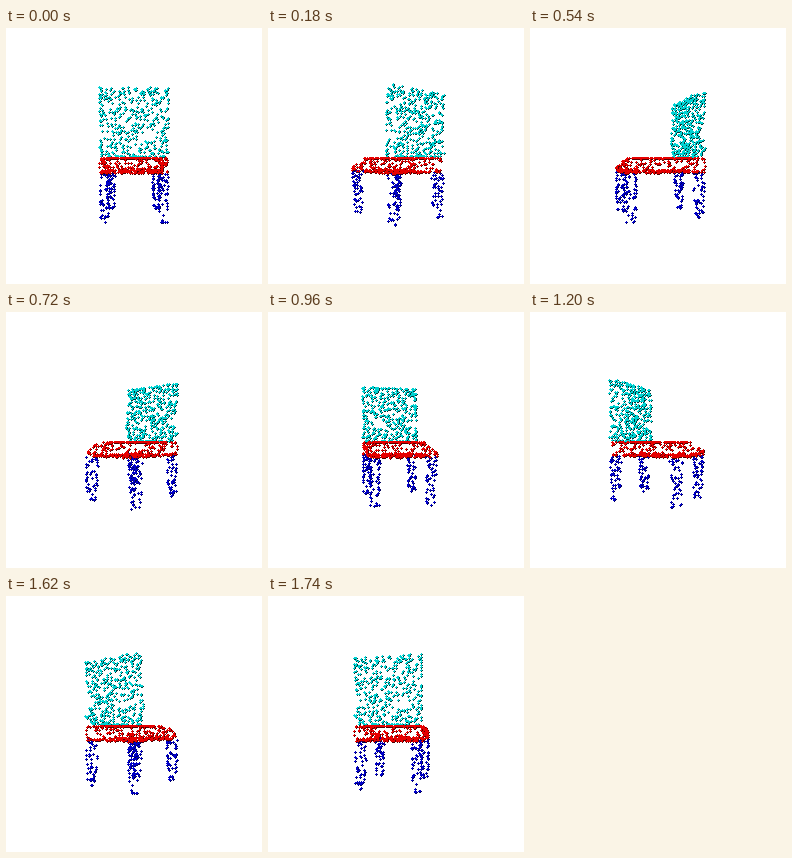
An HTML page with a canvas that plays this animation: 256 by 256 pixels, repeating every 1.8 s.

```html
<!DOCTYPE html>
<html lang="en">
<head>
<meta charset="utf-8">
<title>Rotating chair point cloud</title>
<style>
  html, body { margin: 0; width: 100%; height: 100%; overflow: hidden; background: #fff; }
  canvas { display: block; width: 256px; height: 256px; image-rendering: pixelated; }
</style>
</head>
<body>
<canvas id="stage" width="256" height="256"></canvas>
<script>
const ctx = document.getElementById('stage').getContext('2d');
const STEP = 60, STEPS = 30;
const HALF_W = 29.8, HALF_D = 37.2, CAMERA = 266;
const CENTER_X = 127.9, HORIZON = 130;

let seed = 20177;
function random() {
  seed = (Math.imul(seed, 1664525) + 1013904223) >>> 0;
  return seed / 4294967296;
}

// Random points on the surface of a box, spread evenly by area.
function boxSurface(low, high, count) {
  const size = high.map((v, i) => v - low[i]);
  const areas = [size[1] * size[2], size[0] * size[2], size[0] * size[1]];
  const total = areas[0] + areas[1] + areas[2];
  return Array.from({ length: count }, () => {
    const pick = random() * total;
    const axis = pick < areas[0] ? 0 : pick < areas[0] + areas[1] ? 1 : 2;
    const point = low.map((v, i) => v + random() * size[i]);
    point[axis] = random() < 0.5 ? low[axis] : high[axis];
    return point;
  });
}

// The seat's front edge and front corners curve downwards.
function roundFront([x, y, z]) {
  const front = Math.max(0, -z - HALF_D + 8) / 8;
  const side = Math.max(0, Math.abs(x) - HALF_W + 7) / 7 * Math.max(0, -z / HALF_D);
  const drop = 9 * Math.min(1, Math.hypot(front, side));
  return [x, y + drop * (1 - y / 14), z];
}

// The inner face of the back is slightly smaller than the outer one.
function narrowInside([x, y, z]) {
  const shrink = 1 - 0.035 * (HALF_D - z) / 12;
  return [x * shrink, y * shrink, z];
}

function leg(sideX, sideZ) {
  const x = sideX * (HALF_W - 4.3), z = sideZ * (HALF_D - 4.3);
  return boxSurface([-4.3, 14, -4.3], [4.3, 56.5, 4.3], 54).map(([dx, y, dz]) => {
    const taper = 1 - 0.22 * (y - 14) / 42;
    return [x + dx * taper, y, z + dz * taper];
  });
}

const parts = [
  { bright: 'rgb(0,0,200)', dark: 'rgb(0,0,90)',
    points: [leg(-1, 1), leg(1, 1), leg(-1, -1), leg(1, -1)].flat() },
  { bright: 'rgb(0,210,210)', dark: 'rgb(0,55,55)',
    points: boxSurface([-HALF_W, -60.5, HALF_D - 12], [HALF_W, -1, HALF_D], 440).map(narrowInside) },
  { bright: 'rgb(230,0,0)', dark: 'rgb(80,0,0)',
    points: boxSurface([-HALF_W, 0.5, -HALF_D], [HALF_W, 13.5, HALF_D], 440).map(roundFront) }
];

function draw(step) {
  const angle = step / STEPS * 2 * Math.PI;
  const cos = Math.cos(angle), sin = Math.sin(angle);
  const project = ([x, y, z]) => {
    const scale = CAMERA / (CAMERA + x * sin - z * cos);
    return [
      Math.floor(CENTER_X + (x * cos + z * sin) * scale),
      Math.floor(HORIZON + y * scale)
    ];
  };
  ctx.fillStyle = '#fff';
  ctx.fillRect(0, 0, 256, 256);
  for (const { bright, dark, points } of parts) {
    const dots = points.map(project);
    ctx.fillStyle = dark;
    for (const [x, y] of dots) {
      ctx.fillRect(x - 1, y, 3, 1);
      ctx.fillRect(x, y - 1, 1, 3);
    }
    ctx.fillStyle = bright;
    for (const [x, y] of dots) {
      ctx.fillRect(x - 1, y, 2, 1);
      ctx.fillRect(x, y - 1, 1, 1);
    }
  }
}

let shown = -1;
const start = performance.now();
function tick() {
  const step = Math.floor((performance.now() - start) / STEP) % STEPS;
  if (step !== shown) draw(shown = step);
  requestAnimationFrame(tick);
}
tick();
</script>
</body>
</html>
```
